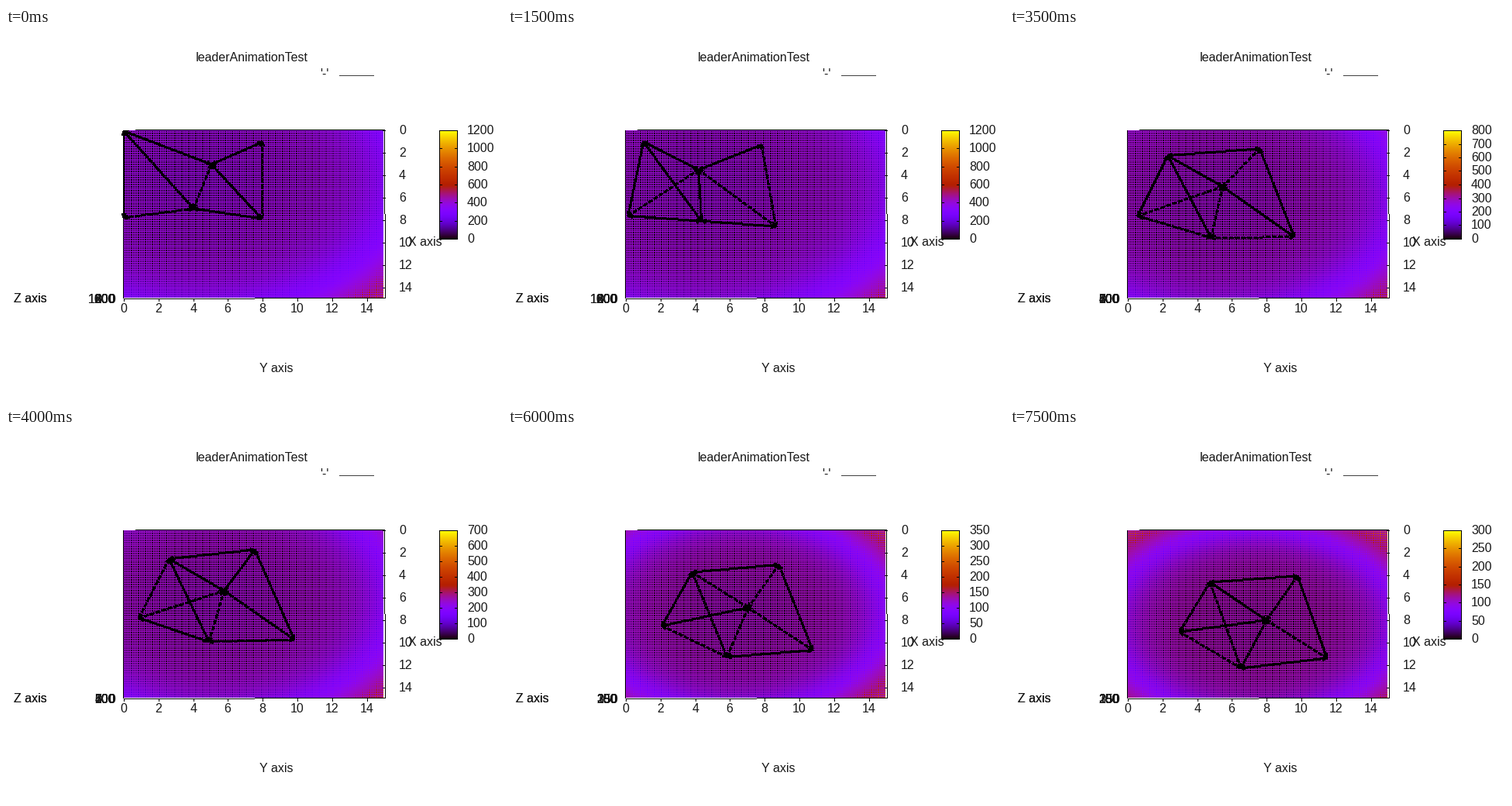
A matplotlib script for the animation above (8 s loop, 640 by 480 pixels).

```python
import numpy as np
import matplotlib.pyplot as plt
from matplotlib.animation import FuncAnimation
from matplotlib.patches import Rectangle

W, H, DPI, FRAMES = 640, 480, 100, 16
LAST = FRAMES - 1
PX = 72 / DPI
X0, Y0, COLS, ROWS = 152, 132, 335, 216
UNIT = np.array([22.4, 14.47])
FONT = dict(family="Liberation Sans", size=16 * PX, color="#181818")

# Agent name: start, (turn time, turn position), end; pixels, steady in between.
ROUTES = {
    "A": ((152, 133), (5, (190, 156)), (258, 199)),
    "B": ((152, 245), (6, (158, 240)), (219, 263)),
    "C": ((265, 176), (3, (246, 183)), (331, 248)),
    "D": ((242, 233), (8, (262, 276)), (298, 310)),
    "E": ((331, 147), (8, (321, 157)), (371, 191)),
    "F": ((330, 246), (8, (372, 273)), (409, 297)),
}
EDGES = "AB AC AD BD CD CE CF DF EF BC AE".split()
APPEARS = {"BC": 1, "AE": 4}


def agents(i):
    return {name: np.array([np.interp(i, [0, when, LAST], axis)
                            for axis in zip(start, turn, end)])
            for name, (start, (when, turn), end) in ROUTES.items()}


def tic_step(v):
    return 200 if v >= 1000 else 100 if v > 500 else 50


def scale_top(i):
    peak = np.interp(i, [0, 3, 7, 10, 13, LAST], [1180, 1010, 720, 445, 290, 260])
    step = tic_step(peak)
    return int(np.ceil(peak / step) * step)


def palette(v):
    v = np.clip(v, 0, 1)
    rgb = np.stack([np.sqrt(v), v ** 3, np.sin(2 * np.pi * v)], axis=-1)
    return np.clip(rgb, 0, 1)


def gaps(size, pitch):
    """Pixels between mesh lines that snap to whole pixels."""
    gap = np.ones(size, bool)
    gap[np.floor(np.arange(0, size, pitch)).astype(int)] = False
    return gap


CELLS = gaps(ROWS, 2.847)[:, None] & gaps(COLS, 2.24)[None, :]
GX, GY = np.meshgrid(np.arange(COLS) / UNIT[0], np.arange(ROWS) / UNIT[1])


def surface(i, pts):
    cx, cy = (np.mean(list(pts.values()), axis=0) - (X0, Y0)) / UNIT
    dist2 = (GX - cx) ** 2 + (GY - cy) ** 2
    level = 0.0145 * dist2 ** 2 / scale_top(i)
    mesh = 0.34 + 0.04 * i / LAST - 0.06 * np.exp(-((level - 0.22) / 0.1) ** 2)
    return palette(np.where(CELLS, level, mesh))


fig = plt.figure(figsize=(W / DPI, H / DPI), dpi=DPI, facecolor="white")
ax = fig.add_axes([0, 0, 1, 1])


def bar(x, y, w, h, color="black"):
    ax.add_patch(Rectangle((x, y), w, h, fc=color, lw=0, antialiased=False, zorder=2))


def stroke(p, q, width, style="-"):
    ax.plot(*zip(p, q), color="black", lw=width * PX, ls=style, antialiased=False,
            solid_capstyle="butt", dash_capstyle="butt", zorder=3)


def label(x, y, s, ha="left"):
    ax.text(x, y, s, ha=ha, va="center_baseline", **FONT)


def draw_arrow(tail, tip):
    stroke(tail, tip, 1.5, (0, (2.7, 2.1)))
    angle = np.arctan2(*(tail - tip)[::-1])
    for turn in (-0.35, 0.35):
        barb = 6 * np.array([np.cos(angle + turn), np.sin(angle + turn)])
        stroke(tip, tip + barb, 1.2)


def draw_axes():
    bar(167, 131, 321, 1)
    bar(151, 132, 1, 217)
    bar(152, 349, 169, 1)
    bar(321, 348, 168, 1)
    bar(488, 131, 1, 109)
    bar(489, 240, 1, 109)
    for v in range(0, 15, 2):
        x, y = np.round((X0, Y0) + v * UNIT)
        bar(x, 349, 1, 4)
        label(x, 361, str(v), "center")
        bar(486, y, 4, 1)
        label(507, y - 1, str(v))


def draw_scale(top):
    ax.imshow(palette(np.linspace(1, 0, 140))[:, None], extent=(559, 582, 273, 132),
              aspect="auto", interpolation="nearest")
    for y in (132, 272):
        bar(559, y, 24, 1)
    for x in (559, 582):
        bar(x, 132, 1, 141)
    for v in range(0, top + 1, tic_step(top)):
        y = 272 - round(140 * v / top)
        for x in (559, 579):
            bar(x, y, 4, 1)
        label(595, y - 1, str(v))
        label(141, 349, str(v), "right")


def draw(i):
    ax.clear()
    pts = agents(i)
    ax.imshow(surface(i, pts), extent=(X0, X0 + COLS, Y0 + ROWS, Y0),
              aspect="auto", interpolation="nearest")
    draw_axes()
    draw_scale(scale_top(i))
    for a, b in EDGES:
        if i >= APPEARS.get(a + b, 0):
            draw_arrow(pts[a], pts[b])
            draw_arrow(pts[b], pts[a])
    label(317.5, 37, "leaderAnimationTest", "center")
    label(417, 58, "'-'", "right")
    bar(430, 61, 45, 1, "#404040")
    label(348.5, 438.5, "Y axis", "center")
    label(519, 275, "X axis")
    for _ in range(2):
        label(10, 348, "Z axis")
    ax.set(xlim=(0, W), ylim=(H, 0))
    ax.axis("off")
    return []


anim = FuncAnimation(fig, draw, frames=FRAMES, interval=500, repeat=True,
                     repeat_delay=0, init_func=lambda: [], cache_frame_data=False)
plt.show()
```
